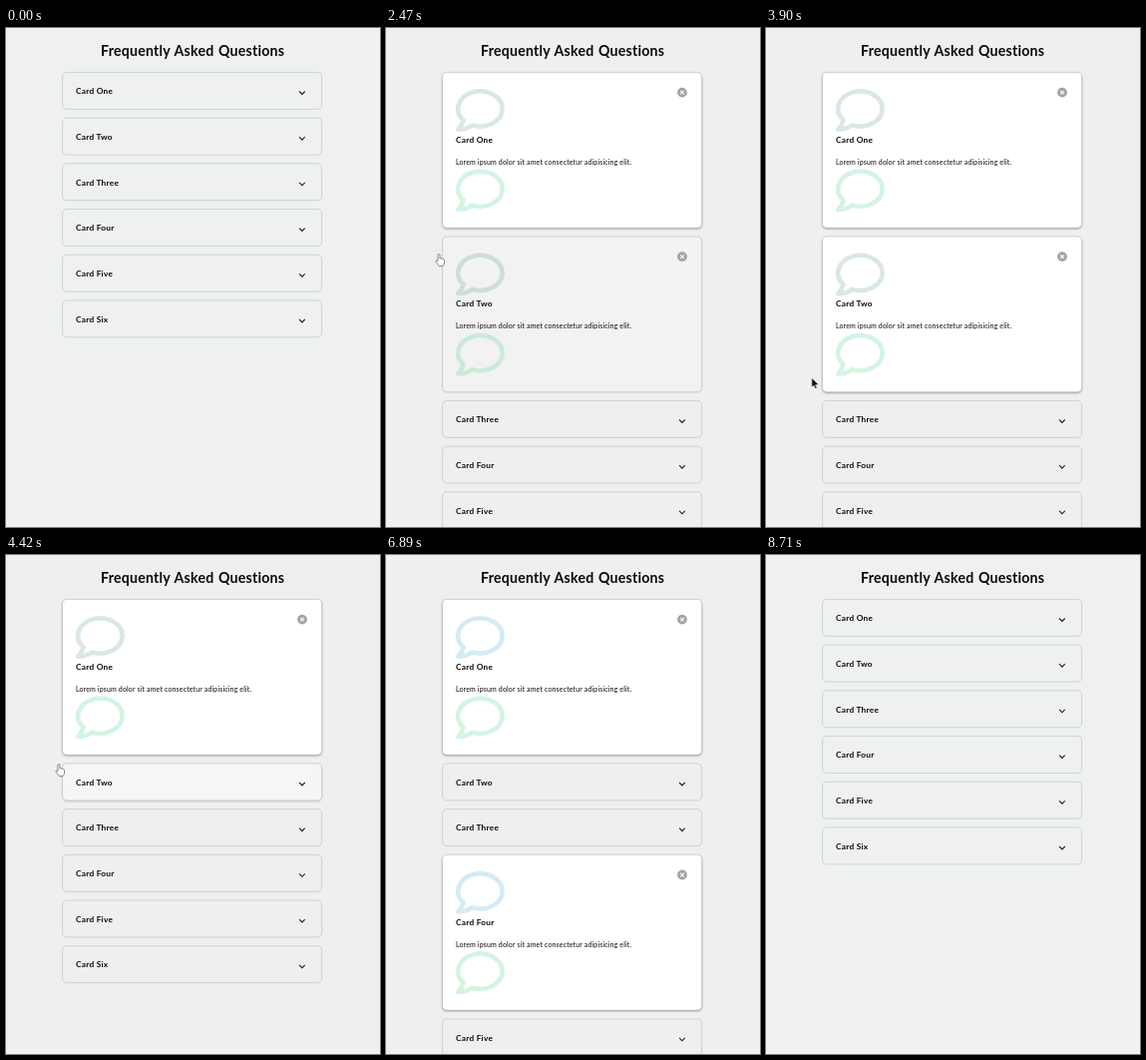
An HTML page that plays this animation: 375x500 px, repeating every 9.62 s.

```html
<!DOCTYPE html>
<html lang="en">
<head>
<meta charset="utf-8">
<title>Frequently Asked Questions</title>
<style>
  html, body { margin: 0; width: 100%; height: 100%; overflow: hidden; }

  /* Each card has an open flag (0 or 1) and a lit level for its white fill. */
  svg {
    display: block; width: 375px; height: 500px;
    background: #eef1f0;
    font-family: Lato, "Open Sans", sans-serif;
    --open: 0; --lit: 0; --dye: #4a8f6f;
    --open1: 0; --lit1: 0; --open2: 0; --lit2: 0; --open4: 0; --lit4: 0;
    animation: one 9620ms step-end infinite, two 9620ms step-end infinite, four 9620ms step-end infinite;
  }
  .c1 { --open: var(--open1); --lit: var(--lit1); }
  .c2 { --open: var(--open2); --lit: var(--lit2); }
  .c4 { --open: var(--open4); --lit: var(--lit4); }
  .after1 { transform: translateY(calc(var(--open1) * 118.8px)); }
  .after2 { transform: translateY(calc(var(--open2) * 118.8px)); }
  .after4 { transform: translateY(calc(var(--open4) * 118.8px)); }

  .fill, .edge { x: 56.6px; y: 44.4px; width: 260px; rx: 4.3px; height: calc(37px + var(--open) * 118.8px); }
  .fill { fill: #fff; opacity: var(--lit); filter: drop-shadow(0 1.2px 1.2px rgba(0, 0, 0, .36)); }
  .edge { fill: none; stroke: #9fa4a8; stroke-opacity: .45; stroke-width: .9px; }
  .more { opacity: var(--open); }
  .less { opacity: calc(1 - var(--open)); }
  .bubble { fill: none; stroke-width: 48; stroke-linejoin: round; opacity: .2; }

  text { fill: #0b0b0b; }
  .title { font-weight: 700; font-size: 14.2px; letter-spacing: .2px; word-spacing: .8px; text-anchor: middle; }
  .name { font-weight: 700; font-size: 8.3px; letter-spacing: .25px; transform: translateY(calc(var(--open) * 48.6px)); }
  .body { font-size: 7px; letter-spacing: .15px; }

  .cursor {
    --hand: 0;
    animation: move 9620ms step-end infinite, show 9620ms step-end infinite, shape 9620ms step-end infinite;
  }
  .hand { opacity: var(--hand); }
  .arrow { opacity: calc(1 - var(--hand)); }

  @keyframes one {
    0% { --open1: 0; --lit1: 0; background: #eef1f0; }
    13.5% { --open1: 1; --lit1: .2; background: #efefef; }
    14.85% { --lit1: .55; }
    16.2% { --lit1: .85; }
    17.55% { --lit1: 1; }
    83.77% { --open1: 0; --lit1: .6; background: #eef1f0; }
    85.12% { --lit1: .25; }
    86.47% { --lit1: 0; }
  }
  @keyframes two {
    0% { --open2: 0; --lit2: 0; }
    25.66% { --open2: 1; --lit2: .2; }
    27.01% { --lit2: .55; }
    28.36% { --lit2: .85; }
    29.71% { --lit2: 1; }
    44.58% { --open2: 0; --lit2: .8; }
    45.93% { --lit2: .45; }
    47.28% { --lit2: .15; }
    48.63% { --lit2: 0; }
  }
  @keyframes four {
    0% { --open4: 0; --lit4: 0; --dye: #4a8f6f; }
    54.04% { --open4: 1; --lit4: .2; --dye: #3498db; }
    55.39% { --lit4: .55; }
    56.74% { --lit4: .85; }
    58.09% { --lit4: 1; }
    78.36% { --open4: 0; --lit4: .8; }
    79.71% { --lit4: .45; }
    81.06% { --lit4: .15; }
    82.41% { --lit4: 0; }
  }

  @keyframes move {
    0% { transform: translate(101px, 168px); }
    5.39% { transform: translate(58px, 32px); }
    8.09% { transform: translate(58px, -5px); }
    21.61% { transform: translate(31px, 262px); animation-timing-function: steps(2); }
    24.31% { transform: translate(49px, 226px); }
    27.01% { transform: translate(49px, 226px); animation-timing-function: steps(4); }
    32.42% { transform: translate(50px, 281px); animation-timing-function: steps(3); }
    36.47% { transform: translate(44px, 397px); }
    39.17% { transform: translate(44px, 397px); animation-timing-function: steps(4); }
    44.58% { transform: translate(49px, 209px); }
    47.28% { transform: translate(49px, 209px); animation-timing-function: steps(4); }
    52.69% { transform: translate(49px, 331px); }
    62.15% { transform: translate(49px, 331px); animation-timing-function: steps(6); }
    70.26% { transform: translate(58px, 2px); }
    74.31% { transform: translate(49px, 430px); animation-timing-function: steps(2); }
    77.01% { transform: translate(49px, 331px); }
    78.36% { transform: translate(49px, 331px); animation-timing-function: steps(3); }
    82.41%, 100% { transform: translate(49px, 168px); }
  }
  @keyframes show {
    0%, 9.44%, 71.61%, 90.53%, 100% { opacity: 0; }
    4.04%, 21.61%, 74.31% { opacity: 1; }
  }
  @keyframes shape {
    0%, 32.42%, 70.26% { --hand: 0; }
    24.31%, 43.23%, 74.31% { --hand: 1; }
  }
</style>
</head>
<body>
<svg viewBox="0 0 375 500">
  <defs>
    <path id="bubble" d="M171 411A232 184 0 1 0 80 360C66 402 40 440 24 456C91 456 140 433 171 411Z"/>
    <g id="card">
      <rect class="fill"/>
      <rect class="edge"/>
      <path class="less" d="M294.1 63.5l2.8 2.9 2.8-2.9" fill="none" stroke="#1c1c1c" stroke-width="1.1"/>
      <g class="more">
        <g class="bubble">
          <use href="#bubble" transform="translate(70 58) scale(.0957)" style="stroke:var(--dye)"/>
          <use href="#bubble" transform="translate(70 138.3) scale(.0957)" stroke="#2ecc71"/>
        </g>
        <text class="body" x="70" y="136.7">Lorem ipsum dolor sit amet consectetur adipisicing elit.</text>
        <circle cx="297" cy="64.6" r="4.9" fill="#9fa4a4"/>
        <path d="M295.2 62.8l3.6 3.6m0-3.6l-3.6 3.6" stroke="#fff" stroke-width="1.1"/>
      </g>
    </g>
  </defs>

  <text class="title" x="187.1" y="28">Frequently Asked Questions</text>

  <g class="c1"><use href="#card"/><text class="name" x="70" y="66.2">Card One</text></g>
  <g class="after1">
    <g transform="translate(0 45.7)"><g class="c2"><use href="#card"/><text class="name" x="70" y="66.2">Card Two</text></g></g>
    <g class="after2">
      <g transform="translate(0 91.4)"><use href="#card"/><text class="name" x="70" y="66.2">Card Three</text></g>
      <g transform="translate(0 137.1)"><g class="c4"><use href="#card"/><text class="name" x="70" y="66.2">Card Four</text></g></g>
      <g class="after4">
        <g transform="translate(0 182.8)"><use href="#card"/><text class="name" x="70" y="66.2">Card Five</text></g>
        <g transform="translate(0 228.5)"><use href="#card"/><text class="name" x="70" y="66.2">Card Six</text></g>
      </g>
    </g>
  </g>

  <g class="cursor">
    <path class="arrow" d="M.6.5V10.2L2.8 8.2 4.3 11.5 5.9 10.8 4.5 7.6H7.6Z" fill="#000" stroke="#fff" stroke-width=".6"/>
    <path class="hand" d="M3 7.5V1.6a1 1 0 0 1 2 0V5a.9.9 0 0 1 1.6.3 .9.9 0 0 1 1.5.4 .9.9 0 0 1 1.4.9V9c0 2-1 3.5-1.5 3.6H4.4C3.5 11 1.5 9.3.9 8c-.3-1 .8-1.4 2.1-.5z" fill="#fff" stroke="#555" stroke-width=".7"/>
  </g>
</svg>
</body>
</html>
```
